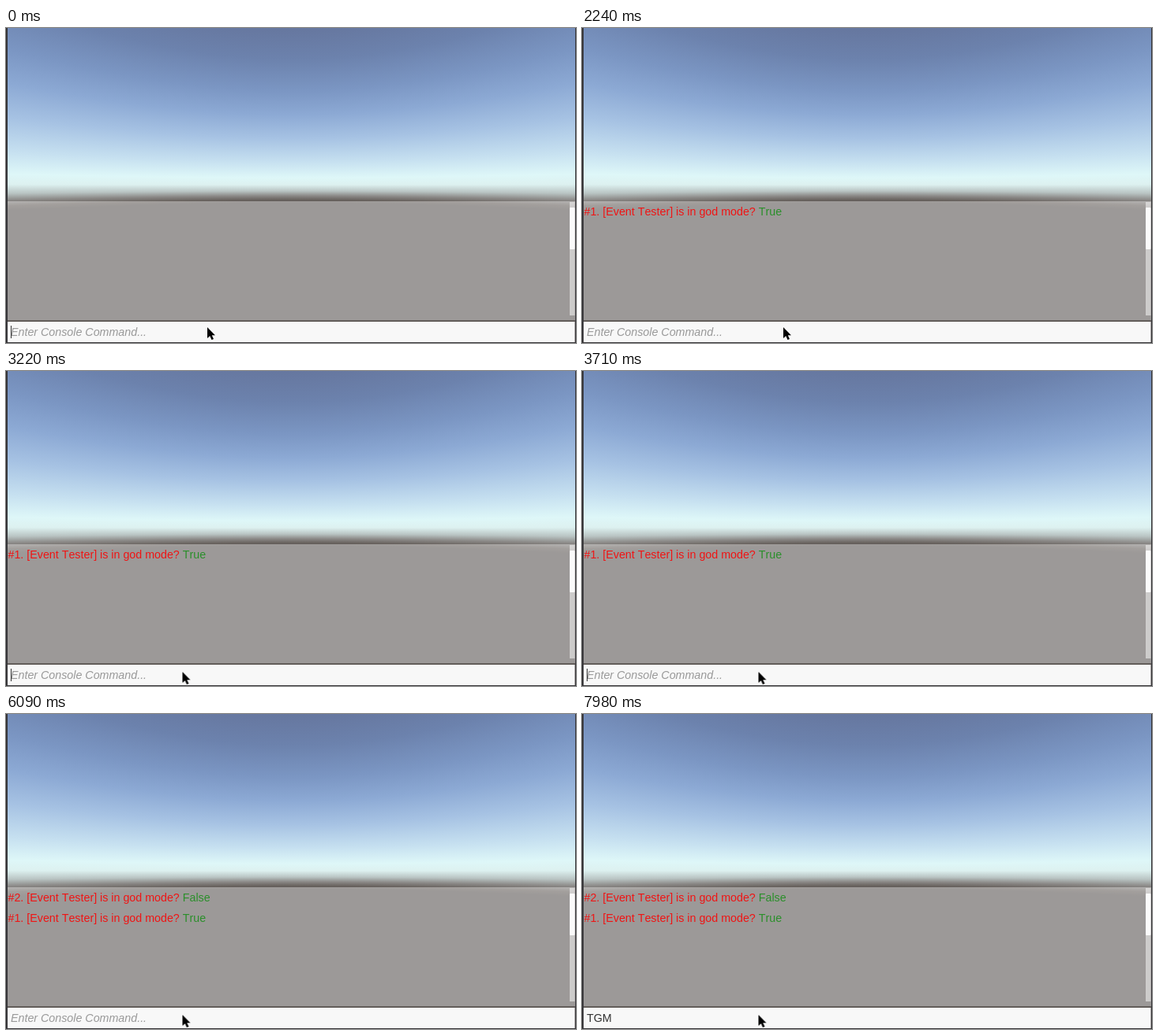
An HTML page with a canvas for the animation above (8 s loop, 722 px wide and 400 px high).

```html
<!DOCTYPE html>
<html lang="en">
<head>
<meta charset="utf-8">
<title>Console</title>
<style>
  html, body { margin: 0; width: 100%; height: 100%; overflow: hidden; background: #353437; }
  canvas, svg { position: absolute; left: 0; top: 0; }
  text { font: 14.28px "Liberation Sans", Arial, sans-serif; font-kerning: none; white-space: pre; }
  .log { fill: #f01414; }
  .log tspan { fill: #2a8f2a; }
  .hint { font-style: italic; fill: #999; }
  .typed { fill: #333; }
  .anim { animation: 8s step-end infinite; }

  /* 1% = 80 ms */
  .hint { animation-name: hint; }
  .t { animation-name: t; }
  .g { animation-name: g; }
  .m { animation-name: m; }
  .caret { animation-name: caret; }
  .first { animation-name: first; }
  .second { animation-name: second; }
  .ring { animation-name: ring; }
  .pointer { animation: point 8s ease-in-out infinite; }

  @keyframes hint {
    0%, 9.625%, 55.125% { opacity: 1; }
    3.5%, 49%, 94.5%, 100% { opacity: 0; }
  }
  @keyframes t {
    0%, 9.625%, 55.125% { opacity: 0; }
    3.5%, 49%, 94.5%, 100% { opacity: 1; }
  }
  @keyframes g {
    0%, 9.625%, 55.125% { opacity: 0; }
    5.25%, 50.75%, 96.25%, 100% { opacity: 1; }
  }
  @keyframes m {
    0%, 9.625%, 55.125% { opacity: 0; }
    6.125%, 51.625%, 98%, 100% { opacity: 1; }
  }
  @keyframes caret {
    0%, 39.375%, 89.25% { opacity: 1; transform: none; }
    3.5%, 46.75%, 55.125%, 96.625%, 100% { opacity: 0; }
    54.125% { opacity: 1; transform: translateX(32px); }
    94.5% { opacity: 1; transform: translateX(9px); }
    96.25% { opacity: 1; transform: translateX(20px); }
  }
  @keyframes first {
    0% { opacity: 0; transform: none; }
    9.625% { opacity: 1; transform: none; }
    55.125%, 100% { opacity: 1; transform: translateY(26px); }
  }
  @keyframes second {
    0% { opacity: 0; }
    55.125%, 100% { opacity: 1; }
  }
  @keyframes ring {
    0%, 39.375%, 89.25%, 100% { opacity: 0; }
    36.75%, 86.625% { opacity: 1; }
  }
  @keyframes point {
    0%, 31.25% { transform: translate(255px, 380px); }
    36.25%, 100% { transform: translate(223.5px, 382px); }
  }
</style>
</head>
<body>
<canvas id="sky" width="722" height="400"></canvas>
<svg width="722" height="400" viewBox="0 0 722 400">
  <rect x="2" y="220" width="719" height="152" fill="#fff" fill-opacity=".385"/>
  <rect x="714" y="221" width="6.5" height="144" fill="#fff" fill-opacity=".5"/>
  <rect x="714" y="228" width="6.5" height="53" rx="1" fill="#fbfbfb"/>
  <rect x="2" y="371" width="719" height="2" fill="#625d5a"/>
  <rect x="2" y="373" width="718.5" height="26" fill="#f8f8f8"/>
  <path d="M0 0h2v400H0zM721 0h1v400h-1zM0 399h722v1H0z" fill="#353437"/>

  <text class="log anim second" x="2.5" y="238">#2. [Event Tester] is in god mode? <tspan>False</tspan></text>
  <text class="log anim first" x="2.5" y="238">#1. [Event Tester] is in god mode? <tspan>True</tspan></text>

  <text class="hint anim" x="6" y="391">Enter Console Command...</text>
  <text class="typed anim t" x="6" y="391">T</text>
  <text class="typed anim g" x="14.7" y="391">G</text>
  <text class="typed anim m" x="25.8" y="391">M</text>
  <rect class="caret anim" x="6" y="378" width="1" height="16" fill="#333"/>

  <circle class="ring anim" cx="223" cy="382" r="21.3" fill="none" stroke="#111" stroke-width="1.6"/>
  <g class="pointer">
    <path d="M0 0V14L3.2 11L5.5 16L8 15L5.8 10.2H10Z" fill="#000" stroke="#fff" stroke-width="1" paint-order="stroke"/>
  </g>
</svg>
<script>
  const ctx = document.getElementById('sky').getContext('2d');
  const W = 722, H = 400, HORIZON = 200, FOCAL = 346;
  // Height on the centre column and its colour
  const stops = [
    [0, '#66779f'], [40, '#6c82ad'], [80, '#7b96c3'], [110, '#8ca9d4'],
    [140, '#a6c2e3'], [170, '#c6e0f0'], [190, '#def7f8'], [199, '#ddf1f0'],
    [207, '#b9c4c3'], [213, '#8b8987'], [218, '#69635f'], [222, '#5e5957']
  ];
  const LAST = stops[stops.length - 1][0];

  // Elevation bands spread away from the horizon towards the sides
  for (let x = 0; x < W; x++) {
    const spread = Math.hypot(1, (x - W / 2) / FOCAL);
    const toY = y => HORIZON + (y - HORIZON) * spread;
    const top = toY(0), bottom = toY(LAST);
    const fill = ctx.createLinearGradient(0, top, 0, bottom);
    for (const [y, color] of stops) fill.addColorStop(y / LAST, color);
    ctx.fillStyle = fill;
    ctx.fillRect(x, 0, 1, H);
  }
</script>
</body>
</html>
```
